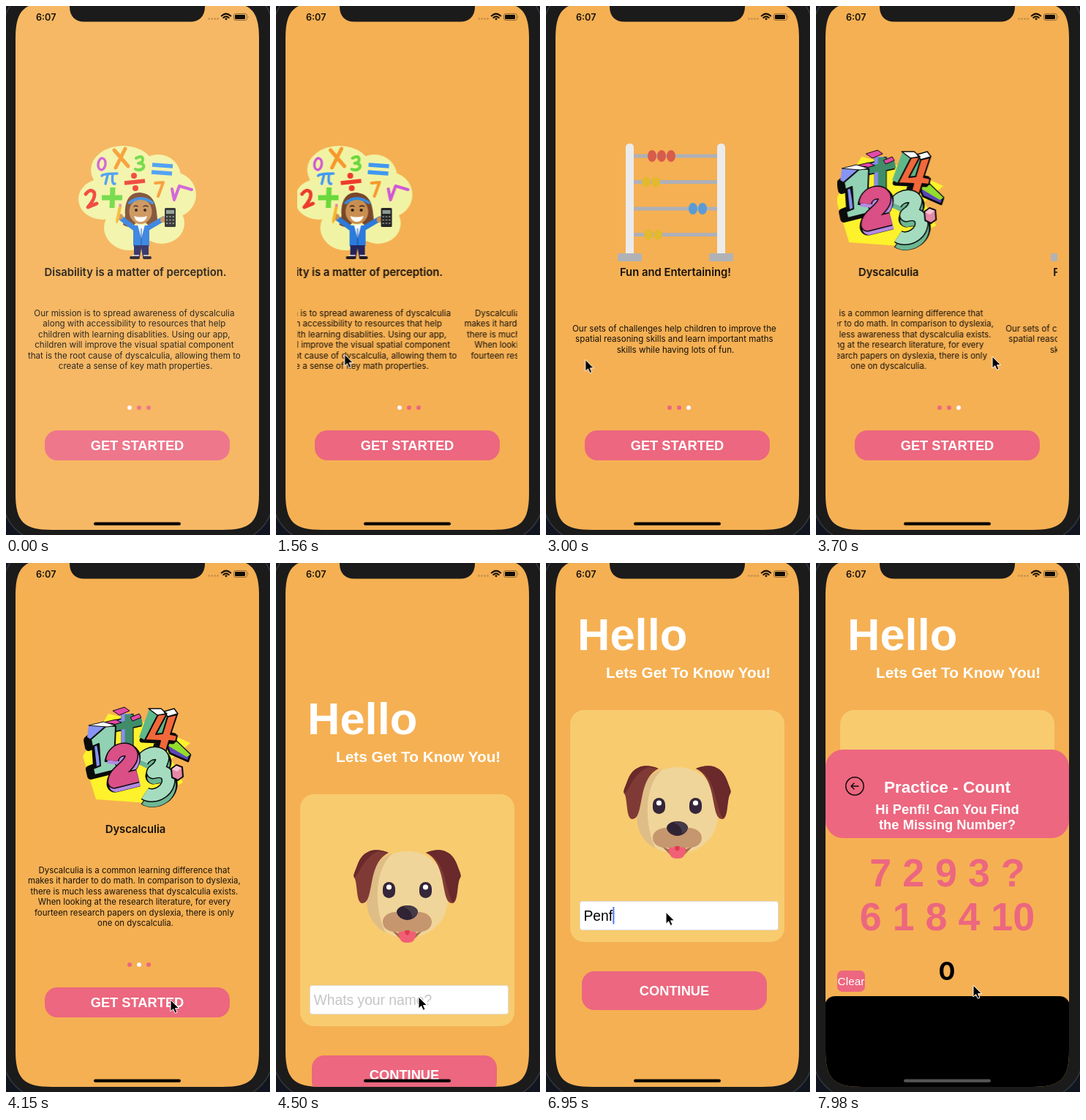
These frames come from a looping animation (361x723 px, 8000 ms). An HTML page:

```html
<!DOCTYPE html>
<html lang="en">
<head>
<meta charset="utf-8">
<title>Math app walkthrough</title>
<style>
html, body { margin: 0; width: 100%; height: 100%; overflow: hidden; background: #10151f; }
svg { display: block; width: 100vw; height: 100vh; }
text { font-family: "Liberation Sans", Arial, sans-serif; }
.ui { font-family: Inter, sans-serif; fill: #15110c; }
.mid { text-anchor: middle; }
.title { font-size: 14.8px; font-weight: 600; }
.body { font-size: 11.6px; }
.dense { font-size: 11.4px; }
.bold { font-weight: 700; }
.white { fill: #fff; }
.bg { fill: #f5b053; }
.pink { fill: #ec677f; }
.btn { font-size: 18.3px; }
.line { fill: none; stroke-linecap: round; stroke-linejoin: round; }
.block { fill: none; stroke-linejoin: round; }
.k { stroke: #0b0b0b; }

.anim { animation: 8s linear infinite; }
#veil { animation-name: veil; }
#pager { animation-name: pager; }
#dot { animation-name: dot; animation-timing-function: step-end; }
#intro { animation-name: intro; }
#hello { animation-name: hello; }
#hint { animation-name: hint; animation-timing-function: step-end; }
#typing { animation-name: typing; animation-timing-function: step-end; }
#caret { animation-name: caret; animation-timing-function: step-end; }
#sheet { animation-name: sheet; }
#bar { animation-name: bar; animation-timing-function: step-end; }
#cursor { animation-name: cursor; }

@keyframes veil { 0%, .25% { opacity: .1 } 1.75%, 100% { opacity: 0 } }
@keyframes pager {
  0%, 17.3% { transform: translateX(0) }
  19.5% { transform: translateX(-73px) }
  21% { transform: translateX(-130px); animation-timing-function: ease-out }
  27.125%, 27.5% { transform: translateX(-301px) }
  29.875% { transform: translateX(-418px) }
  32% { transform: translateX(-500px); animation-timing-function: ease-out }
  37.5%, 42% { transform: translateX(-602px) }
  46.25% { transform: translateX(-379px) }
  48% { transform: translateX(-345px); animation-timing-function: ease-out }
  50.5%, 100% { transform: translateX(-301px) }
}
@keyframes dot {
  0% { transform: translateX(0) }
  21% { transform: translateX(13px) }
  32% { transform: translateX(26px) }
  48%, 100% { transform: translateX(13px) }
}
@keyframes intro {
  0%, 52.25% { opacity: 1; transform: translateY(0) }
  55.25%, 100% { opacity: 0; transform: translateY(-91px) }
}
@keyframes hello {
  0%, 52.25% { opacity: 0; transform: translateY(115px) }
  55.25% { opacity: 1; transform: translateY(115px) }
  58.125% { opacity: 1; transform: translateY(115px); animation-timing-function: ease-out }
  65.5%, 100% { opacity: 1; transform: translateY(0) }
}
@keyframes hint { 0% { opacity: 1 } 78.1%, 100% { opacity: 0 } }
@keyframes typing {
  0% { transform: translateX(0) }
  78.1% { transform: translateX(12.9px) }
  80.6% { transform: translateX(23.6px) }
  83.1% { transform: translateX(34.3px) }
  85.6% { transform: translateX(40.2px) }
  88.7%, 100% { transform: translateX(45px) }
}
@keyframes caret { 0% { opacity: 0 } 59% { opacity: 1 } 71% { opacity: 0 } 75.3%, 100% { opacity: 1 } }
@keyframes sheet {
  0%, 98% { transform: translateY(470px); animation-timing-function: cubic-bezier(.3, .1, .75, .9) }
  99.7%, 100% { transform: translateY(0) }
}
@keyframes bar { 0% { fill: #080604 } 99.35%, 100% { fill: #555 } }
@keyframes cursor {
  0%, 3.6% { transform: translate(289px, 726px) }
  8.75% { transform: translate(194px, 470px) }
  13.25%, 13.95% { transform: translate(247px, 588px) }
  14%, 17.3% { transform: translate(194px, 299px) }
  17.375% { transform: translate(167px, 476px) }
  19.5% { transform: translate(94px, 476px) }
  21% { transform: translate(55px, 478px) }
  27.5% { transform: translate(205px, 483px) }
  29.875% { transform: translate(96px, 483px) }
  32% { transform: translate(46px, 485px) }
  42% { transform: translate(60px, 482px) }
  46.25% { transform: translate(241px, 479px) }
  48% { transform: translate(255px, 482px) }
  51%, 52.5% { transform: translate(225px, 597px) }
  56.25%, 58.1% { transform: translate(195px, 593px) }
  66%, 70.9% { transform: translate(193px, 478px) }
  75.5%, 77.2% { transform: translate(186px, 386px) }
  81.5% { transform: translate(172px, 323px) }
  86.875% { transform: translate(164px, 478px) }
  89.5% { transform: translate(176px, 324px) }
  94% { transform: translate(218px, 575px) }
  97.5%, 100% { transform: translate(215px, 577px) }
}
</style>
</head>
<body>
<svg viewBox="0 0 361 723">
  <defs>
    <clipPath id="screen">
      <path d="M13 45C13 6 24 -5 63 -5H296C335 -5 346 6 346 45V666C346 705 335 716 296 716H63C24 716 13 705 13 666Z"/>
    </clipPath>
    <clipPath id="window"><rect x="29" y="150" width="301" height="380"/></clipPath>
    <path id="plus" d="M88 206V258M70 223L106 215"/>
    <path id="four" d="M130 207L142 206L127 234L136 233L143 210L156 207L147 234L156 236L154 244L145 243L138 267L127 265L133 243L112 242Z"/>
    <path id="one" d="M38 241L60 222L72 223L70 270L75 282L43 290L41 281L51 277L49 247L40 251Z"/>
    <path id="two" d="M67 270C69 251 98 250 93 267C89 280 70 286 70 299L102 291"/>
    <path id="three" d="M108 271C116 255 141 258 135 271C132 282 124 283 123 286C147 279 150 303 135 313C128 318 118 319 112 315"/>
  </defs>

  <rect x="-4" y="-26" width="369" height="758" rx="58" fill="#1b1b1b" stroke="#34383f" stroke-width="1.5"/>

  <g clip-path="url(#screen)">
    <rect class="bg" x="13" y="-16" width="333" height="732"/>

    <g id="intro" class="anim">
      <g clip-path="url(#window)">
        <g id="pager" class="anim">
          <!-- page one -->
          <g>
            <g fill="#f1f3a4">
              <ellipse cx="160" cy="224" rx="44" ry="33"/>
              <ellipse cx="208" cy="233" rx="31" ry="30"/>
              <ellipse cx="228" cy="258" rx="32" ry="31"/>
              <ellipse cx="132" cy="264" rx="33" ry="28"/>
              <ellipse cx="169" cy="303" rx="35" ry="31"/>
              <ellipse cx="213" cy="297" rx="31" ry="28"/>
              <ellipse cx="180" cy="264" rx="42" ry="38"/>
            </g>
            <g class="line" stroke-width="4">
              <ellipse cx="131" cy="216" rx="5" ry="8" stroke="#cf58d6" stroke-width="3.4" transform="rotate(8 131 216)"/>
              <path d="M148 197L167 219M163 195L150 221" stroke="#f7982b" stroke-width="5"/>
              <path d="M178 208Q187 203 187 210Q187 214 181 215Q190 215 188 221Q184 226 177 223" stroke="#6ad83c"/>
              <path d="M200 217L228 219M199 227L227 229" stroke="#3f98f2" stroke-width="5.5" stroke-linecap="butt"/>
              <path d="M131 232Q133 229 152 229M139 231L136 243M146 230Q144 244 149 243" stroke="#3f98f2" stroke-width="3.4"/>
              <path d="M162 242L190 239" stroke="#ee3a2c" stroke-width="5.5" stroke-linecap="butt"/>
              <path d="M175 232v.1M177 249v.1" stroke="#ee3a2c" stroke-width="8"/>
              <path d="M204 242L215 241L208 260" stroke="#f7982b"/>
              <path d="M227 250L230 265L237 246L254 251" stroke="#cf58d6"/>
              <path d="M109 257Q115 249 120 254Q124 261 112 275L124 270" stroke="#ee3a2c" stroke-width="4.8"/>
              <path d="M146 248L145 276M131 262L159 262" stroke="#6ad83c" stroke-width="7" stroke-linecap="butt"/>
            </g>
            <path d="M184 255C165 254 162 273 163 286L160 299Q170 306 178 296H191Q199 306 209 298C204 289 211 258 184 255Z" fill="#79462a"/>
            <path class="line" d="M176 304L156 289M193 304L215 291" stroke="#2b7bdd" stroke-width="7"/>
            <path d="M174 300H196V328H174Z" fill="#2b7bdd"/>
            <path d="M180 299L185 318L190 299Z" fill="#f4f7ff"/>
            <path d="M185 304V328" stroke="#174b96"/>
            <path d="M175 327H195V343H187L185 331L183 343H175Z" fill="#25255c"/>
            <path class="line" d="M171 344H181M189 344H197" stroke="#241a22" stroke-width="4"/>
            <path d="M173 341H182M188 341H196" stroke="#ece7e5" stroke-width="1.5"/>
            <ellipse cx="184" cy="281" rx="15.5" ry="17" fill="#c98f51"/>
            <path d="M168 276Q173 264 184 264Q196 264 201 276Q200 257 184 256Q168 258 168 276Z" fill="#79462a"/>
            <path class="line" d="M169 269Q184 257 200 269" stroke="#348ae0" stroke-width="4"/>
            <path class="line" d="M175 274Q178 272 180 274M188 274Q191 272 194 274" stroke="#3c2116" stroke-width="1.5"/>
            <circle cx="178" cy="279" r="2" fill="#201510"/><circle cx="190" cy="279" r="2" fill="#201510"/>
            <path d="M175 287Q184 290 193 287Q191 295 184 295Q177 295 175 287Z" fill="#fff"/>
            <circle cx="156" cy="288" r="4" fill="#c98f51"/><circle cx="215" cy="292" r="4" fill="#c98f51"/>
            <path d="M154 274L158 275L154 294L151 298L150 293Z" fill="#f6b62b"/>
            <path d="M154 274L158 275L158 271L155 270Z" fill="#e88996"/>
            <rect x="217" y="276" width="15" height="26" rx="1.5" fill="#252525"/>
            <rect x="219" y="279" width="11" height="5" fill="#8b9a91"/>
            <path d="M219 288H230M219 292.500H230M219 297H230" stroke="#a0a0a0" stroke-width="1.500" stroke-dasharray="2.300 2"/>
            <text class="ui mid title" x="177" y="368.500">Disability is a matter of perception.</text>
            <text class="ui mid body" y="424">
              <tspan x="177">Our mission is to spread awareness of dyscalculia</tspan>
              <tspan x="177" dy="14.4">along with accessibility to resources that help</tspan>
              <tspan x="177" dy="14.4">children with learning disablities. Using our app,</tspan>
              <tspan x="177" dy="14.4">children will improve the visual spatial component</tspan>
              <tspan x="177" dy="14.4">that is the root cause of dyscalculia, allowing them to</tspan>
              <tspan x="177" dy="14.4">create a sense of key math properties.</tspan>
            </text>
          </g>

          <!-- page two -->
          <g transform="translate(301 0)">
            <g class="block" transform="translate(78 0)">
              <path d="M27 264L62 206L112 218L174 246L148 268L164 300L128 319L114 328L45 323Z" fill="#fdf22c"/>
              <path d="M143 252L150 239L174 262L171 271L146 260Z" fill="#5a45b8" stroke="#0b0b0b" stroke-width="2.500"/>
              <path d="M144 250L150 239L174 262L169 265Z" fill="#93dd2c"/>
              <use href="#plus" class="k" stroke-width="17"/>
              <use href="#plus" stroke="#8a8df0" stroke-width="13" transform="translate(-2 0)"/>
              <use href="#plus" stroke="#3f8d69" stroke-width="11" transform="translate(2 1)"/>
              <path d="M68 202L84 197L91 202L77 208ZM55 218L72 214L80 218L62 223ZM92 211L104 206L107 211L95 216Z" fill="#e44aa7" stroke="#0b0b0b"/>
              <use href="#four" class="k" stroke-width="7" transform="translate(-4 0)" fill="#0b0b0b"/>
              <path d="M104 238L118 199L130 207L112 242ZM128 234L140 203L143 210L136 233Z" fill="#5fb889"/>
              <use href="#four" class="k" stroke-width="2" fill="#f2683a"/>
              <path d="M117 199L134 199L142 206L129 208ZM138 203L152 199L157 206L143 210Z" fill="#fff" stroke="#0b0b0b" stroke-width="1.500"/>
              <use href="#one" class="k" stroke-width="10" transform="translate(-5 1)" fill="#0b0b0b"/>
              <path d="M33 238L35 222L55 217L60 222L38 241Z" fill="#8794f2"/>
              <path d="M46 248L51 277L46 279L43 250Z" fill="#8794f2"/>
              <use href="#one" class="k" stroke-width="2" fill="#91d2b4"/>
              <path d="M35 222L55 217L72 222L60 224Z" fill="#fff" stroke="#0b0b0b"/>
              <use href="#three" class="k" stroke-width="23" transform="translate(1 5)"/>
              <use href="#three" stroke="#6cb793" stroke-width="18" transform="translate(1 7)"/>
              <use href="#three" class="k" stroke-width="19"/>
              <use href="#three" stroke="#a5dcc0" stroke-width="16"/>
              <use href="#two" class="k" stroke-width="23" transform="translate(1 3)"/>
              <use href="#two" stroke="#b48ae4" stroke-width="18" transform="translate(2 5)"/>
              <use href="#two" class="k" stroke-width="19"/>
              <use href="#two" stroke="#d94f86" stroke-width="16"/>
              <path d="M148 281L155 276L163 279L164 292L157 297L149 293Z" fill="#e58aa8" stroke="#0b0b0b" stroke-width="2"/>
              <path d="M149 282L155 277L162 280L156 285Z" fill="#f6c2d1"/>
            </g>
            <text class="ui mid title" x="177" y="368.500">Dyscalculia</text>
            <text class="ui mid dense" y="424">
              <tspan x="177">Dyscalculia is a common learning difference that</tspan>
              <tspan x="177" dy="14.4">makes it harder to do math. In comparison to dyslexia,</tspan>
              <tspan x="177" dy="14.4">there is much less awareness that dyscalculia exists.</tspan>
              <tspan x="177" dy="14.4">When looking at the research literature, for every</tspan>
              <tspan x="177" dy="14.4">fourteen research papers on dyslexia, there is only</tspan>
              <tspan x="177" dy="14.4">one on dyscalculia.</tspan>
            </text>
          </g>

          <!-- page three -->
          <g transform="translate(602 0)">
            <path d="M115 205H240M115 240.500H240M115 277H240M115 312.500H240" stroke="#adb0b8" stroke-width="5"/>
            <g fill="#d95b4a"><ellipse cx="145" cy="205" rx="6" ry="8"/><ellipse cx="158" cy="205" rx="6" ry="8"/><ellipse cx="171" cy="205" rx="6" ry="8"/></g>
            <g fill="#e3b92f"><ellipse cx="137" cy="240.500" rx="6" ry="7"/><ellipse cx="150" cy="240.500" rx="6" ry="7"/><ellipse cx="140" cy="312.500" rx="6" ry="7"/><ellipse cx="153" cy="312.500" rx="6" ry="7"/></g>
            <g fill="#5a9bd5"><ellipse cx="201" cy="277" rx="6" ry="8"/><ellipse cx="214" cy="277" rx="6" ry="8"/></g>
            <rect x="109" y="188" width="11" height="155" rx="5" fill="#ebebeb"/>
            <rect x="234" y="188" width="11" height="155" rx="5" fill="#ebebeb"/>
            <rect x="98" y="338" width="33" height="11" rx="2" fill="#b1b2b6"/>
            <rect x="223" y="338" width="33" height="11" rx="2" fill="#b1b2b6"/>
            <text class="ui mid title" x="177" y="368.500">Fun and Entertaining!</text>
            <text class="ui mid body" y="445">
              <tspan x="177">Our sets of challenges help children to improve the</tspan>
              <tspan x="177" dy="14.4">spatial reasoning skills and learn important maths</tspan>
              <tspan x="177" dy="14.4">skills while having lots of fun.</tspan>
            </text>
          </g>
        </g>
      </g>

      <g class="pink"><circle cx="169" cy="549" r="3"/><circle cx="182" cy="549" r="3"/><circle cx="195" cy="549" r="3"/></g>
      <circle id="dot" class="anim white" cx="169" cy="549" r="3"/>
      <rect class="pink" x="53" y="580" width="253" height="41" rx="17"/>
      <text class="mid bold white btn" x="179.5" y="607">GET STARTED</text>
    </g>

    <g id="hello" class="anim">
      <text class="bold white" x="43" y="119" font-size="61.5">Hello</text>
      <text class="bold white" x="82" y="157" font-size="20.8">Lets Get To Know You!</text>
      <rect x="33" y="201" width="293" height="317" rx="19" fill="#f8cb6f"/>

      <!-- dog -->
      <path d="M179.5 279C145 279 126 305 124 342C123 374 148 397 179.500 397C211 397 236 374 235 342C233 305 214 279 179.500 279Z" fill="#f0d59a"/>
      <path d="M160 281C137 289 125 312 124 342C123 366 134 382 150 390C136 363 131 306 160 281Z" fill="#dfbd87"/>
      <path id="ear" d="M154 281C133 272 118 280 112 296C108 307 105 312 107 315C112 322 109 350 118 350C127 350 128 335 132 316C136 298 142 287 154 281Z" fill="#803a35"/>
      <path d="M154 281C133 272 118 280 112 296C108 307 105 312 107 315C113 313 119 287 140 279Z" fill="#6a292b"/>
      <use href="#ear" transform="matrix(-1 0 0 1 359 0)"/>
      <path d="M205 281C226 272 241 280 247 296C251 307 254 312 252 315C247 322 249 345 242 349C230 332 234 291 205 281Z" fill="#6a292b"/>
      <path d="M157 386Q179.500 400 202 386L190 398H169Z" fill="#a86d50"/>
      <path d="M168 386H191V394Q190 404 179.500 404Q169 404 168 394Z" fill="#f05f75"/>
      <path d="M179.500 365C170 359 146 361 146 376C147 393 172 390 179.500 387C187 390 212 393 213 376C213 361 189 359 179.500 365Z" fill="#c6966e"/>
      <path d="M176.500 387H182.500V391Q179.500 396 176.500 391Z" fill="#e2384f"/>
      <path d="M179.500 353C171 353 165 357 165 362C166 369 174 373 179.500 373C185 373 193 369 194 362C194 357 188 353 179.500 353Z" fill="#2f2334"/>
      <path d="M179.500 353C188 353 194 357 194 362C193 366 189 369 186 370Q187 361 174 354Z" fill="#463b48"/>
      <g fill="#35263a"><rect x="146" y="321" width="17" height="22" rx="8.500"/><rect x="196" y="321" width="17" height="22" rx="8.500"/></g>
      <circle class="white" cx="154.500" cy="328" r="3.600"/><circle class="white" cx="204.500" cy="328" r="3.600"/>

      <rect x="46.500" y="462.500" width="271" height="39" rx="3" fill="#fff" stroke="#dedede"/>
      <text x="51.5" y="489" font-size="19.3">Penfi</text>
      <g id="typing" class="anim">
        <rect class="white" x="51" y="466" width="80" height="32"/>
        <rect id="caret" class="anim" x="51.300" y="470" width="1.800" height="23.500" fill="#3f6cf0"/>
      </g>
      <text id="hint" class="anim" x="51.5" y="489" font-size="19.3" fill="#c5c5c7">Whats your name?</text>
      <rect class="pink" x="49" y="558" width="253" height="53" rx="17"/>
      <text class="mid bold white btn" x="175.5" y="591">CONTINUE</text>
    </g>

    <g id="sheet" class="anim">
      <rect class="bg" x="13" y="255" width="333" height="740" rx="25"/>
      <rect class="pink" x="13" y="255" width="333" height="121" rx="24"/>
      <g class="line" stroke="#130a0c" stroke-width="1.500">
        <circle cx="53" cy="305" r="12.200"/>
        <path d="M58 305H48M52 301L48 305L52 309"/>
      </g>
      <g class="mid bold white">
        <text x="179.5" y="314" font-size="22.6">Practice - Count</text>
        <text x="179.5" y="343" font-size="18.4">Hi Penfi! Can You Find</text>
        <text x="179.5" y="364" font-size="18.4">the Missing Number?</text>
      </g>
      <g class="mid bold pink" font-size="53.8">
        <text x="179.5" y="442">7 2 9 3 ?</text>
        <text x="179.5" y="502">6 1 8 4 10</text>
      </g>
      <text class="ui mid bold" x="179" y="570" font-size="34" style="fill:#000">0</text>
      <rect class="pink" x="29" y="557" width="38" height="29" rx="7"/>
      <text class="mid white" x="48" y="577" font-size="15.4">Clear</text>
      <rect x="12" y="592" width="335" height="400" rx="14"/>
    </g>

    <rect id="veil" class="anim white" x="13" y="-16" width="333" height="732"/>
    <rect id="bar" class="anim" x="120" y="705.500" width="119" height="4.300" rx="2.150"/>

    <!-- status bar -->
    <path d="M84 -6Q87 -4 87 1C87 14 95 21.500 107 21.500H252C264 21.500 272 14 272 1Q272 -4 275 -6Z" fill="#1b1b1b"/>
    <text class="ui" x="41" y="19.500" font-size="12.6" font-weight="600">6:07</text>
    <path class="line" d="M277.500 17.500H290" stroke="#bd8a4c" stroke-width="2.600" stroke-dasharray=".01 4"/>
    <g class="line" stroke="#120d06" stroke-width="2" stroke-linecap="butt">
      <path d="M294.800 13.500Q301 7.800 307.200 13.500M297.300 16Q301 12.700 304.700 16"/>
      <path d="M299 17.300Q301 15.800 303 17.300L301 19.500Z" fill="#120d06" stroke="none"/>
    </g>
    <rect x="311.500" y="10.500" width="18" height="9" rx="2.600" fill="none" stroke="#8d6836"/>
    <rect x="313" y="12" width="14" height="6" rx="1.300" fill="#120d06"/>
    <path d="M331 13.500Q332.500 15 331 16.500Z" fill="#8d6836"/>
  </g>

  <path id="cursor" class="anim" d="M0 0V16L3.700 12.600L6.200 18.300L9 17.100L6.500 11.600H11.500Z" stroke="#fff" stroke-linejoin="round"/>
</svg>
</body>
</html>
```
